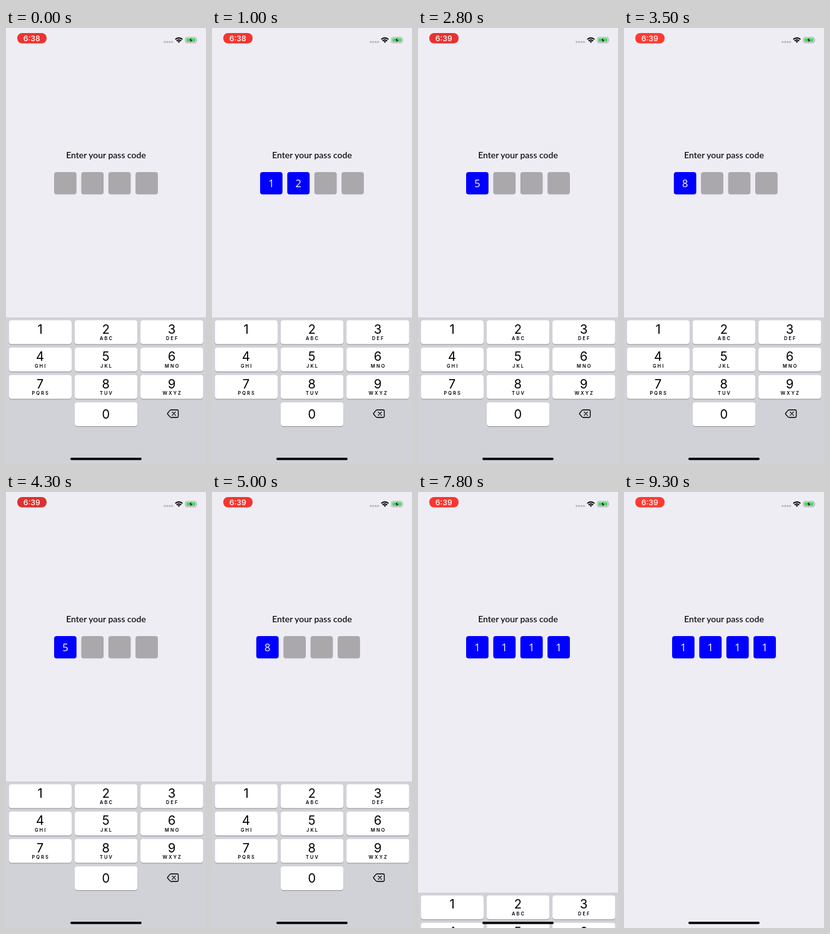
An HTML page that plays this animation: 320x693 px, repeating every 9.4 s.

```html
<!DOCTYPE html>
<html lang="en">
<head>
<meta charset="utf-8">
<title>Pass code</title>
<style>
  html, body { margin: 0; width: 100%; height: 100%; overflow: hidden; background: #efedf4; }
  svg { display: block; width: 320px; height: 693px; }
  text { text-anchor: middle; }
  .title { font: 500 14px Lato, sans-serif; }
  .clock { font: 500 12.3px Inter, sans-serif; fill: #fff; }
  .code { font: 500 16.5px "Open Sans", sans-serif; fill: #fff; }
  .digit { font: 400 20px Inter, sans-serif; }
  .letters { font: 600 7.4px Inter, sans-serif; letter-spacing: 2.1px; }
</style>
</head>
<body>
<svg viewBox="0 0 320 693">
  <rect id="pill" x="18" y="8" width="47" height="16.5" rx="8"/>
  <text id="clock" class="clock" x="41.3" y="20.7"></text>
  <g fill="#b9b7bc">
    <circle cx="253.8" cy="22.2" r="1.6"/><circle cx="257.8" cy="22.2" r="1.6"/>
    <circle cx="261.8" cy="22.2" r="1.6"/><circle cx="265.6" cy="22.2" r="1.6"/>
  </g>
  <g fill="none" stroke="#000" stroke-width="2">
    <path d="M270.9 18.1a8 8 0 0 1 11.4 0"/>
    <path d="M273 20.5a5 5 0 0 1 7.2 0"/>
    <path d="M274.6 21.6l2 2.2 2-2.2q-2-1.6-4 0z" fill="#000" stroke="none"/>
  </g>
  <rect x="287" y="14.8" width="17.6" height="8.9" rx="2.4" fill="none" stroke="#a3a2a7" stroke-width=".9"/>
  <rect x="288.4" y="16.2" width="14.8" height="6.1" rx="1.2" fill="#4cd964"/>
  <path d="M305.5 17.6q1.4 1.6 0 3.3z" fill="#a3a2a7"/>
  <path d="M297.3 15l-4.9 4.8h3l-1.2 3.8 4.9-4.9h-3z" fill="#000" stroke="#dff5e4" stroke-width=".4"/>

  <text class="title" x="160" y="206.7">Enter your pass code</text>
  <g id="boxes"></g>
  <g id="keyboard">
    <rect y="460" width="320" height="240" fill="#d1d1d8"/>
    <g fill="none" stroke="#000" stroke-width="1.3" stroke-linejoin="round" stroke-linecap="round">
      <path d="M264 607h9.8q1.8 0 1.8 1.8v8.4q0 1.8-1.8 1.8H264q-.8 0-1.4-.6l-4-4.6q-.6-.8 0-1.6l4-4.6q.6-.6 1.4-.6z"/>
      <path d="M266 610.4l5.2 5.2m0-5.2l-5.2 5.2"/>
    </g>
  </g>
  <rect x="103" y="682.9" width="114" height="3.8" rx="1.9"/>
</svg>
<script>
const LOOP = 9400, PRESS = 100, SLIDE_START = 7652, MINUTE = 2500;
const $ = id => document.getElementById(id);

function add(parent, tag, attrs, text = '') {
  const el = document.createElementNS('http://www.w3.org/2000/svg', tag);
  for (const name in attrs) el.setAttribute(name, attrs[name]);
  el.textContent = text;
  return parent.appendChild(el);
}

const boxes = [0, 1, 2, 3].map(i => {
  const x = 77 + i * 43.4;
  return {
    rect: add($('boxes'), 'rect', { x, y: 229, width: 35.8, height: 35.6, rx: 4 }),
    label: add($('boxes'), 'text', { class: 'code', x: x + 17.9, y: 253 })
  };
});

const letters = ['', 'ABC', 'DEF', 'GHI', 'JKL', 'MNO', 'PQRS', 'TUV', 'WXYZ'];
const keys = {};
function addKey(digit, col, row, caption) {
  const x = 4.5 + col * 105.3, y = 464.5 + row * 43.5, board = $('keyboard');
  const shape = { x, width: 100.5, height: 38, rx: 4.2 };
  add(board, 'rect', { ...shape, y: y + 1, fill: '#8e8f94' });
  keys[digit] = add(board, 'rect', { ...shape, y });
  add(board, 'text', { class: 'digit', x: x + 50, y: y + (row < 3 ? 21 : 25.7) }, digit);
  add(board, 'text', { class: 'letters', x: x + 51.2, y: y + 31.9 }, caption);
}
letters.forEach((caption, i) => addKey(i + 1, i % 3, Math.floor(i / 3), caption));
addKey(0, 1, 3, '');

// Each attempt: digits, press times, moment of rejection, digit left over
const attempts = [
  { digits: '1234', times: [400, 900, 1400, 1900], fail: 2050, rest: '4' },
  { digits: '5678', times: [2700, 3100, 3200, 3300], fail: 3435, rest: '8' },
  { digits: '5678', times: [4200, 4400, 4600, 4800], fail: 4898, rest: '8' },
  { digits: '1212', times: [5500, 5800, 6100, 6400], fail: 6541, rest: '' },
  { digits: '1111', times: [6900, 7100, 7300, 7500], fail: Infinity, rest: '' }
];

function shake(t) {
  return t < 0 || t > 400 ? 0 : 9 * (1 - t / 400) * Math.sin(t / 150 * 2 * Math.PI);
}

function slide(t) {
  const w = Math.max(0, t) * 0.01826;
  return 234 * (1 - (1 + w) * Math.exp(-w));
}

function draw(t) {
  let code = '', pressed = null, offset = 0;
  for (const { digits, times, fail, rest } of attempts) {
    times.forEach((time, i) => {
      if (t >= time && t < time + PRESS) pressed = digits[i];
      if (t >= time + PRESS && t < fail) code = digits.slice(0, i + 1);
    });
    if (t >= fail) {
      code = t < fail + 200 ? rest : '';
      offset += shake(t - fail);
    }
  }
  boxes.forEach(({ rect, label }, i) => {
    rect.setAttribute('fill', code[i] ? '#00f' : '#aaa8ab');
    label.textContent = code[i] || '';
  });
  for (const digit in keys) keys[digit].setAttribute('fill', digit === pressed ? '#b5bfcf' : '#fff');
  $('boxes').setAttribute('transform', `translate(${offset} 0)`);
  $('keyboard').setAttribute('transform', `translate(0 ${slide(t - SLIDE_START)})`);

  const glow = Math.cos((t - 3450) / 2000 * 2 * Math.PI);
  $('pill').setAttribute('fill', `rgb(${Math.min(255, 238 + 20 * glow)}, ${53 + 5 * glow}, 48)`);
  $('clock').textContent = t < MINUTE ? '6:38' : '6:39';
}

function tick() {
  draw(performance.now() % LOOP);
  requestAnimationFrame(tick);
}
tick();
</script>
</body>
</html>
```
